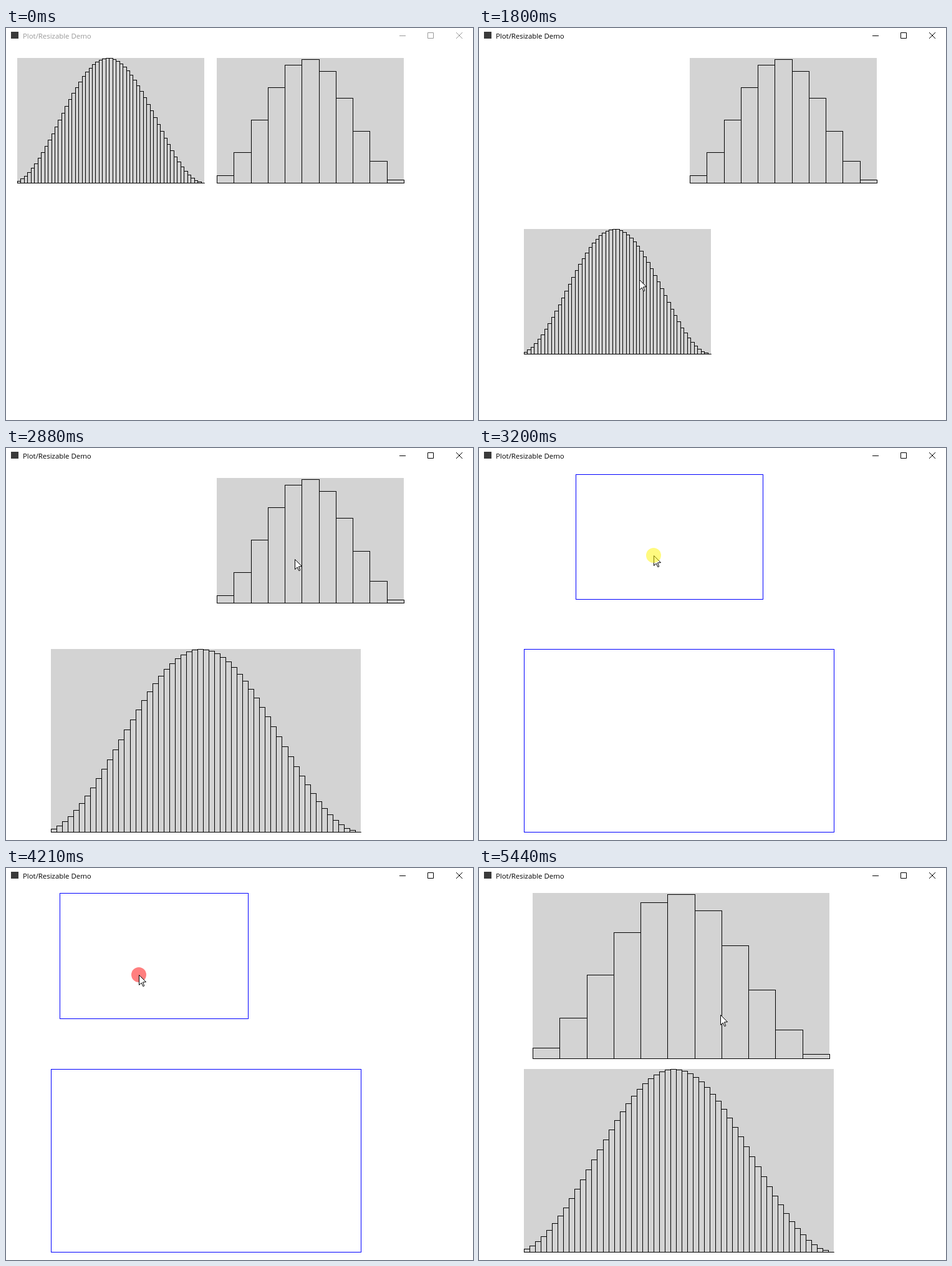
Write an HTML page with a canvas that moves like this. It is 749 px wide and 628 px high and loops after 7.28 s.

```html
<!DOCTYPE html>
<html lang="en">
<head>
<meta charset="utf-8">
<title>Plot/Resizable Demo</title>
<style>
  html, body { margin: 0; width: 100%; height: 100%; overflow: hidden; background: #fff; }
  #bar { position: absolute; inset: 0 0 auto 0; height: 28px; color: #000; }
  #bar.idle { color: #999; }
  #icon { position: absolute; left: 8px; top: 6px; width: 12px; height: 11px; background: #3a3a3a; }
  #bar span { position: absolute; left: 27px; top: 5px; font: 11.4px/16px "Open Sans", "Noto Sans", sans-serif; white-space: nowrap; }
  #bar svg { position: absolute; left: 0; top: 0; fill: none; stroke: currentColor; }
  canvas { position: absolute; left: 0; top: 0; }
</style>
</head>
<body>
<div id="bar" class="idle">
  <div id="icon"></div>
  <span>Plot/Resizable Demo</span>
  <svg width="749" height="28">
    <path d="M631 12.5h10M676.5 7.5h9v9h-9zM722 7l10 10M732 7l-10 10"/>
  </svg>
</div>
<canvas id="stage" width="749" height="628"></canvas>
<script>
const LOOP = 7280, TICK = 82.3, LEAD = 14;
const ENTER = 3, FOCUS = 12;
const bar = document.getElementById('bar');
const ctx = document.getElementById('stage').getContext('2d');

// Pointer glides, timed in ticks. A glide with a panel drags its
// position or size until the button is released at `drop`.
const home = [609, 522];
const glides = [
  { at: [3, 11], to: [192, 157] },
  { at: [12, 17], to: [246, 431], drop: 19, panel: 0, keys: ['x', 'y'] },
  { at: [19, 22], to: [257, 403] },
  { at: [23, 28], to: [454, 496], drop: 29, panel: 0, keys: ['w', 'h'] },
  { at: [29, 35], to: [463, 178] },
  { at: [35.2, 41], to: [211, 170], drop: 49, panel: 1, keys: ['x', 'y'] },
  { at: [50.2, 62], to: [387, 235], drop: 66, panel: 1, keys: ['w', 'h'] }
];

// Bell curve, and the same curve averaged in groups of five
const fine = Array.from({ length: 55 }, (_, i) => Math.cos(0.05505 * i - 1.4397) ** 2);
const coarse = Array.from({ length: 11 }, (_, i) =>
  fine.slice(i * 5, i * 5 + 5).reduce((a, b) => a + b) / 5);

function ease(u) {
  u = Math.min(1, Math.max(0, u));
  return u * u * (3 - 2 * u);
}

function stateAt(tick) {
  const panels = [18, 338].map(x => ({ x, y: 48, w: 300, h: 200 }));
  let pos = home, drag = null;
  for (const g of glides) {
    if (tick < g.at[0]) break;
    const k = ease((tick - g.at[0]) / (g.at[1] - g.at[0]));
    const shift = pos.map((p, i) => Math.round((g.to[i] - p) * k));
    pos = pos.map((p, i) => p + shift[i]);
    if (!g.keys) continue;
    g.keys.forEach((key, i) => panels[g.panel][key] += shift[i]);
    if (tick < g.drop) drag = g.keys[0] === 'x' ? 'move' : 'size';
  }
  return { panels, pos, drag };
}

function plot({ x, y, w, h }, bars) {
  ctx.fillStyle = '#d3d3d3';
  ctx.fillRect(x, y, w, h);
  ctx.strokeStyle = '#000';
  const edge = i => Math.round(x + w * i / bars.length);
  bars.forEach((v, i) => {
    const top = Math.round(y + h * (1 - v));
    ctx.strokeRect(edge(i) + 0.5, top + 0.5, edge(i + 1) - edge(i), y + h - top);
  });
}

function outline({ x, y, w, h }) {
  ctx.strokeStyle = '#00f';
  ctx.strokeRect(x + 0.5, y + 0.5, w, h);
}

function halo([x, y], color) {
  ctx.fillStyle = color;
  ctx.beginPath();
  ctx.arc(x, y, 12, 0, Math.PI * 2);
  ctx.fill();
}

const arrow = new Path2D('M.5.5V16.5L4.2 13L6.8 18.6L8.8 17.8L6.4 12L11.5 11.6Z');
function cursor([x, y]) {
  ctx.save();
  ctx.translate(x, y);
  ctx.fillStyle = '#fff';
  ctx.strokeStyle = '#000';
  ctx.fill(arrow);
  ctx.stroke(arrow);
  ctx.restore();
}

function draw(tick) {
  const { panels, pos, drag } = stateAt(tick);
  bar.className = tick < FOCUS ? 'idle' : '';
  ctx.clearRect(0, 0, 749, 628);
  if (drag) {
    panels.forEach(outline);
  } else {
    plot(panels[0], fine);
    plot(panels[1], coarse);
  }
  if (tick < ENTER) return;
  if (drag === 'size') halo(pos, 'rgba(255,0,0,.5)');
  cursor(pos);
  if (drag === 'move') halo(pos, 'rgba(255,245,0,.5)');
}

let shown = -1;
function run(now) {
  const tick = Math.floor((now % LOOP + LEAD) / TICK);
  if (tick !== shown) draw(shown = tick);
  requestAnimationFrame(run);
}
draw(0);
requestAnimationFrame(run);
</script>
</body>
</html>
```
